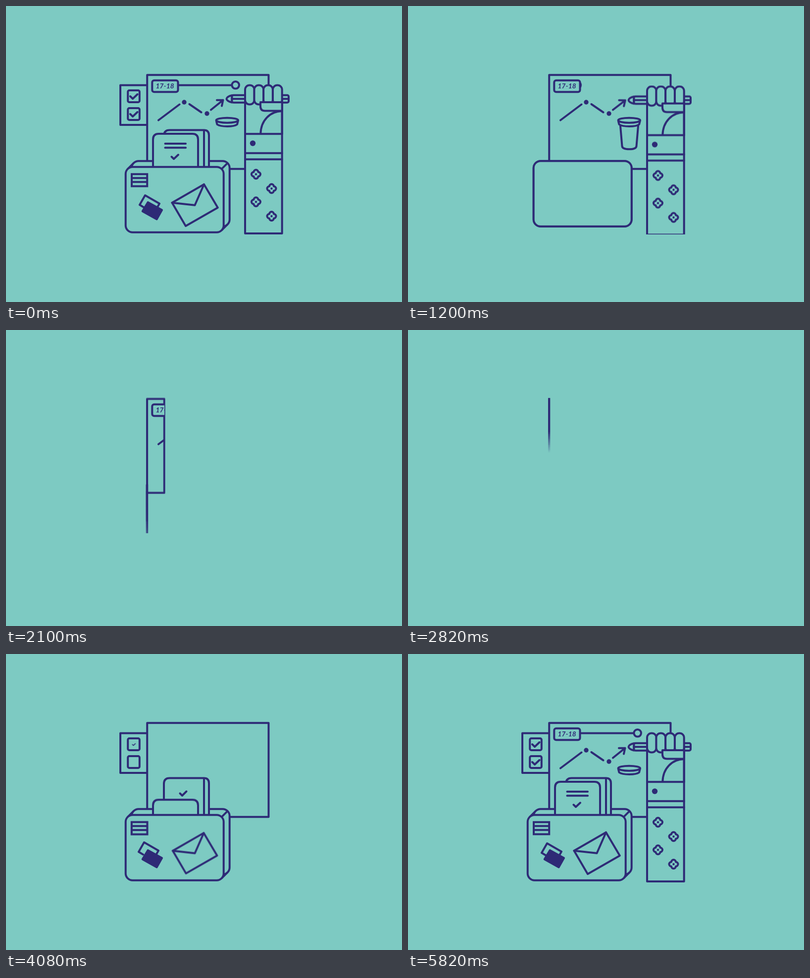
An HTML page without scripts that plays this animation: 800x600 px, repeating every 5850 ms.

```html
<!DOCTYPE html>
<html lang="en">
<head>
<meta charset="utf-8">
<title>Office loop</title>
<style>
html, body { margin: 0; width: 100%; height: 100%; overflow: hidden; background: #7dcac2; }
svg { display: block; width: 800px; height: 600px; }
.art { fill: #7dcac2; stroke: #2e2a76; stroke-width: 4; stroke-linecap: round; stroke-linejoin: round; }
.line { fill: none; }
.ink { fill: #2e2a76; stroke: none; }
.butt { stroke-linecap: butt; }
.keep { vector-effect: non-scaling-stroke; }
.mid { transform-box: fill-box; transform-origin: center; }
text { font: italic 700 13.5px Lato, "Open Sans", sans-serif; text-anchor: middle; letter-spacing: .3px; }

[class*="a-"] { animation: 5.85s cubic-bezier(.33, 0, .2, 1) infinite; }
.a-panel { animation-name: panel; }
.a-tick { animation-name: tick; }
.a-board { animation-name: board; transform-origin: 285px 140px; }
.a-label { animation-name: label; }
.a-slide { animation-name: slide; }
.a-draw { animation-name: draw; stroke-dasharray: 60 90; }
.a-dot { animation-name: dot; }
.a-turn { animation-name: turn; transform-origin: 414px 210px; }
.arrow { transform-origin: 414px 210px; }
.a-bag { animation-name: bag; transform-origin: 285px 318px; }
.a-front { animation-name: front; }
.a-back { animation-name: back; }
.a-edge { animation-name: edge; stroke-dasharray: 17 30; }
.a-card1 { animation-name: card1; }
.a-card2 { animation-name: card2; }
.a-rule { animation-name: rule; stroke-dasharray: 44 90; }
.a-mark { animation-name: mark; }
.a-stamp { animation-name: stamp; }
.a-bar { animation-name: bar; stroke-dasharray: 32 90; }
.a-mail { animation-name: mail; }
.a-case { animation-name: case; }
.a-lift { animation-name: lift; }
.a-drop { animation-name: drop; }
.a-lid { animation-name: lid; transform-origin: 447px 233px; }
.a-band { animation-name: band; transform-origin: 447px 232px; }
.a-cup { animation-name: cup; transform-origin: 447px 244px; }
.a-hand { animation-name: hand; }

@keyframes panel {
  0%, 6.84% { transform: none; animation-timing-function: ease-in-out; }
  14.7%, 52.82% { transform: translateX(60px); }
  56.92% { transform: translateX(-1.2px); }
  59.5%, 100% { transform: none; }
}
@keyframes tick {
  0%, 14.7% { transform: scale(1); }
  14.71%, 68.97% { transform: scale(0); }
  72% { transform: scale(1.2); }
  74.5%, 100% { transform: scale(1); }
}
@keyframes board {
  0%, 29% { transform: scale(1, 1); }
  31.6% { transform: scale(1.03, 1); animation-timing-function: ease-in-out; }
  37.4%, 40% { transform: scale(.002, 1); animation-timing-function: ease-in-out; }
  46.7% { transform: scale(.002, .004); }
  51.8% { transform: scale(.002, 1); }
  64.6%, 100% { transform: scale(1, 1); }
}
@keyframes label {
  0%, 40% { transform: scale(1); }
  40.01%, 80.7% { transform: scale(0); }
  84.3% { transform: scale(1.1); }
  87.2%, 100% { transform: scale(1); }
}
@keyframes slide {
  0%, 12.8% { transform: none; animation-timing-function: ease-in-out; }
  23.1%, 86.3% { transform: translateX(-140px); }
  95.7%, 100% { transform: none; }
}
@keyframes draw {
  0%, 40% { stroke-dashoffset: 0; }
  40.01%, 84.6% { stroke-dashoffset: 62; }
  88.9%, 100% { stroke-dashoffset: 0; }
}
@keyframes dot {
  0%, 40% { transform: scale(1); }
  40.01%, 84.6% { transform: scale(0); }
  88.9%, 100% { transform: scale(1); }
}
@keyframes turn {
  0%, 19.7% { transform: rotate(0); }
  26%, 93.2% { transform: rotate(16deg); }
  99.4%, 100% { transform: rotate(0); }
}
@keyframes bag {
  0%, 28.2% { transform: scale(1, 1); opacity: 1; animation-timing-function: ease-in-out; }
  33.85% { transform: scale(.002, 1); animation-timing-function: ease-in-out; }
  39% { transform: scale(.002, .01); opacity: 1; }
  39.01%, 51.7% { transform: scale(.002, .01); opacity: 0; }
  51.71% { transform: scale(.002, .01); opacity: 1; }
  56% { transform: scale(.002, 1); }
  63.2%, 100% { transform: scale(1, 1); opacity: 1; }
}
@keyframes front {
  0%, 7.18% { transform: none; animation-timing-function: ease-in-out; }
  15.73%, 45% { transform: translate(12px, -12px); }
  45.01%, 100% { transform: none; }
}
@keyframes back {
  0%, 45% { transform: none; }
  45.01%, 61.5% { transform: translate(-12px, 12px); }
  66%, 100% { transform: none; }
}
@keyframes edge {
  0%, 7.18% { stroke-dashoffset: 0; animation-timing-function: ease-in-out; }
  15.73%, 61.5% { stroke-dashoffset: 17; }
  66%, 100% { stroke-dashoffset: 0; }
}
@keyframes card1 {
  0%, 1.03% { transform: none; animation-timing-function: ease-in-out; }
  6.15%, 67.69% { transform: translateY(74px); }
  74.02%, 100% { transform: none; }
}
@keyframes card2 {
  0%, 3.08% { transform: none; animation-timing-function: ease-in-out; }
  8.55%, 63.08% { transform: translateY(84px); }
  68.72%, 100% { transform: none; }
}
@keyframes rule {
  0%, 40% { stroke-dashoffset: 0; }
  40.01%, 73.5% { stroke-dashoffset: 47; }
  78.5%, 100% { stroke-dashoffset: 0; }
}
@keyframes mark {
  0%, 40% { transform: scale(1); }
  40.01%, 77% { transform: scale(0); }
  81%, 100% { transform: scale(1); }
}
@keyframes stamp {
  0%, 8.55% { transform: scale(1); animation-timing-function: ease-in; }
  13.5%, 62.9% { transform: scale(0); }
  67.5% { transform: scale(1.06); }
  72%, 100% { transform: scale(1); }
}
@keyframes bar {
  0%, 1.7% { stroke-dashoffset: 0; animation-timing-function: ease-in; }
  9.7%, 65% { stroke-dashoffset: 34; }
  68.2%, 100% { stroke-dashoffset: 0; }
}
@keyframes mail {
  0%, 1.03% { transform: scale(1); animation-timing-function: ease-in-out; }
  7.18%, 63.6% { transform: scale(0); }
  71.5%, 100% { transform: scale(1); }
}
@keyframes case {
  0%, 2% { transform: scale(1); animation-timing-function: ease-in-out; }
  8.2%, 63.2% { transform: scale(0); }
  69%, 100% { transform: scale(1); }
}
@keyframes lift {
  0% { transform: none; }
  8.2%, 65% { transform: translate(6px, 8px); }
  69.7% { transform: translate(-2px, -2px); }
  73.5%, 100% { transform: none; }
}
@keyframes drop {
  0%, 22.05% { transform: none; animation-timing-function: ease-in-out; }
  30.8%, 40% { transform: translateY(57px); }
  40.01%, 100% { transform: none; }
}
@keyframes lid {
  0%, 29.2% { transform: scale(1); }
  30.9%, 95% { transform: scale(0); }
  99.2%, 100% { transform: scale(1); }
}
@keyframes band {
  0%, 21% { transform: scaleY(1); }
  25%, 40% { transform: scaleY(.01); }
  40.01%, 100% { transform: scaleY(1); }
}
@keyframes cup {
  0%, .4% { transform: scaleY(0); }
  7.2%, 30.4% { transform: scaleY(1); }
  30.41%, 100% { transform: scaleY(0); }
}
@keyframes hand {
  0%, 18.2% { transform: none; animation-timing-function: cubic-bezier(.32, 0, .67, 0); }
  30%, 83.4% { transform: translateY(306px); }
  99.2%, 100% { transform: none; }
}
</style>
</head>
<body>
<svg viewBox="0 0 800 600">
  <defs>
    <clipPath id="leftOf"><path d="M200 140H285V260H200Z"/></clipPath>
    <clipPath id="inBoard"><rect class="a-board" x="283" y="138" width="249" height="194"/></clipPath>
    <clipPath id="rightOf"><path d="M340 140H500V180H340Z"/></clipPath>
    <clipPath id="underLid"><rect class="a-drop" x="415" y="232" width="65" height="75"/></clipPath>
    <clipPath id="desk"><path d="M430 100H600V463H430Z"/></clipPath>
    <g id="flower">
      <path d="M-4.5-4.5a4.5 4.5 0 0 1 9 0a4.5 4.5 0 0 1 0 9a4.5 4.5 0 0 1-9 0a4.5 4.5 0 0 1 0-9Z"/>
      <circle class="ink" r="2.2"/>
    </g>
    <rect id="finger" y="160.500" width="18.700" height="39" rx="9"/>
  </defs>

  <g class="art">
    <!-- checklist -->
    <g clip-path="url(#leftOf)">
      <g class="a-panel">
        <path d="M290 160.500H231V241H290"/>
        <rect x="246.200" y="171" width="23.600" height="24" rx="3"/>
        <rect x="246.200" y="207" width="23.600" height="24" rx="3"/>
        <path class="line mid a-tick" d="M251 183l5 5 9.500-9"/>
        <path class="line mid a-tick" style="animation-delay:-5.7s" d="M251 219l5 5 9.500-9"/>
      </g>
    </g>

    <!-- board -->
    <rect class="keep a-board" x="285.200" y="139.700" width="245.300" height="190.500"/>
    <g clip-path="url(#inBoard)">
      <g clip-path="url(#rightOf)">
        <g class="a-slide">
          <path d="M330 160.500H456"/>
          <circle cx="463.700" cy="160.300" r="7.300"/>
        </g>
      </g>
      <g class="mid a-label">
        <rect x="295.300" y="150.700" width="52.200" height="23.600" rx="4"/>
        <text class="ink" x="321.200" y="167.300">17-18</text>
      </g>
      <path class="line a-draw" d="M308 231.500L350.500 199.500"/>
      <circle class="ink mid a-dot" style="animation-delay:-5.7s" cx="360" cy="195" r="4.700"/>
      <path class="line a-draw" style="animation-delay:-5.6s" d="M370.500 199L394.500 215.500"/>
      <circle class="ink mid a-dot" style="animation-delay:-5.45s" cx="406" cy="218" r="4.700"/>
      <g class="a-turn">
        <path class="line arrow a-dot" style="animation-delay:-5.35s" d="M414 210.500L438.500 190.700M426 190.700H438.500L436 202.500"/>
      </g>
    </g>

    <!-- cup -->
    <g clip-path="url(#underLid)">
      <path class="a-cup" d="M429 243L432.500 284Q433 290.300 447 290.300T461.500 284L465 243"/>
    </g>
    <g class="a-drop">
      <g class="a-lid">
        <path class="keep a-band" d="M425 234L426.500 240Q432 244 447 244T467 240L468.500 234"/>
        <ellipse cx="446.800" cy="231.700" rx="22.300" ry="5"/>
      </g>
    </g>

    <!-- bag -->
    <g class="a-bag">
      <g class="a-back">
        <rect class="keep" x="253.700" y="314.200" width="198" height="132.500" rx="14"/>
        <path class="line butt keep a-edge" d="M257.800 318.300l-12 12M447.600 318.300l-12 12M447.600 442.600l-12 12"/>
      </g>
      <g class="a-card2">
        <path class="keep" d="M319 345V263Q319 251.500 330.500 251.500H400Q410 251.500 410 262V345Z"/>
        <path class="line keep" d="M400 252V345"/>
        <path class="line" d="M351.500 282.500l4.500 4.500 8.500-8.500"/>
      </g>
      <g class="a-card1">
        <path class="keep" d="M297 345V270.500Q297 259 308.500 259H376.500Q388 259 388 270.500V345Z"/>
        <path class="line a-rule" d="M321.500 279H363"/>
        <path class="line a-rule" style="animation-delay:-5.75s" d="M321.500 287.200H363"/>
        <path class="line mid a-mark" d="M334.500 305.500l4.500 4.500 9-8.500"/>
      </g>
      <rect class="keep a-front" x="241.700" y="326.200" width="198" height="132.500" rx="14"/>
      <g class="mid a-stamp">
        <rect x="254" y="340.800" width="31.200" height="24.500" stroke-linejoin="miter"/>
        <path class="line butt a-bar" d="M254 348.700H285"/>
        <path class="line butt a-bar" style="animation-delay:-5.76s" d="M254 356.700H285"/>
      </g>
      <g class="mid a-case">
        <path class="line a-lift" d="M279 408.500L270 403L281 383.800L310 400.500L306 407.500"/>
        <path class="ink" d="M287.500 396Q286 395 285 396.800L274 415Q273 417 275 418L303.500 434Q305.300 435 306.300 433.300L316.800 414.500Q317.800 412.700 316 411.700Z"/>
      </g>
      <g class="mid a-mail">
        <path d="M335.500 398.700L400 361.500L427.800 408.700L363 446Z"/>
        <path class="line" d="M335.500 398.700L381.500 403.800L400 361.500"/>
      </g>
    </g>

    <!-- hand -->
    <g clip-path="url(#desk)">
      <g class="a-hand">
        <path d="M483 185H557.700V461H483Z"/>
        <path d="M456.500 181C449 182.500 445.500 186 445.500 188.200S449 194 456.500 195.500Z"/>
        <rect x="456.500" y="180.800" width="114.500" height="15" rx="3"/>
        <path d="M456.500 188.200H571"/>
        <path stroke="none" d="M485 190H555.700V215H485Z"/>
        <path class="line" d="M483 190V259M557.700 190V259M514.300 259C515 232 533 213.500 557.700 213"/>
        <use href="#finger" x="483"/>
        <use href="#finger" x="501.500"/>
        <use href="#finger" x="520.200"/>
        <use href="#finger" x="539"/>
        <path d="M514 195H557.700V212.500H523Q514 212.500 514 203Z"/>
        <path class="line" d="M483 259.300H557.700M483 298.300H557.700M483 310.800H557.700"/>
        <circle class="ink" cx="498.500" cy="278.300" r="5.700"/>
        <use href="#flower" x="505" y="341"/>
        <use href="#flower" x="536.500" y="370"/>
        <use href="#flower" x="505" y="397"/>
        <use href="#flower" x="536.500" y="426"/>
      </g>
    </g>
  </g>
</svg>
</body>
</html>
```
